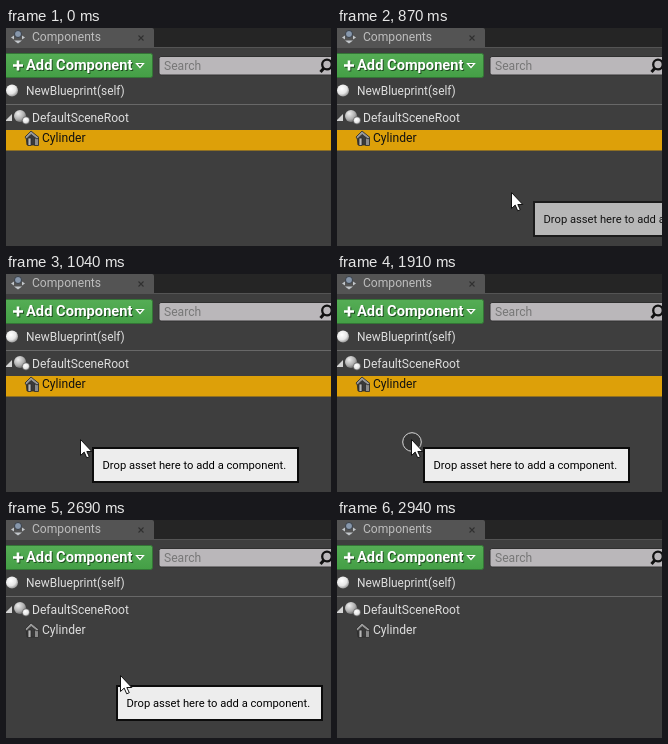
Recreate the animation shown at these times as an HTML page. Size 325 by 218 pixels, loop 3750 ms.

```html
<!DOCTYPE html>
<html lang="en">
<head>
<meta charset="utf-8">
<title>Components panel</title>
<style>
  html, body { margin: 0; width: 100%; height: 100%; overflow: hidden; background: #3e3e3e; }
  svg { display: block; width: 325px; height: 218px; }
  text { font: 12.1px Roboto, "Noto Sans", sans-serif; fill: #dedede; }
  .button { font-size: 14.67px; font-weight: 700; fill: #fff; }
  .tip { font-size: 11.2px; fill: #000; }
</style>
</head>
<body>
<svg viewBox="0 0 325 218">
  <defs>
    <linearGradient id="green" x2="0" y2="1">
      <stop stop-color="#55ad55"/><stop offset="1" stop-color="#449f46"/>
    </linearGradient>
    <radialGradient id="ball" cx=".4" cy=".35" r=".7">
      <stop stop-color="#fff"/><stop offset=".6" stop-color="#e6e6e6"/><stop offset="1" stop-color="#8a8a8a"/>
    </radialGradient>
    <radialGradient id="grayBall" cx=".35" cy=".3" r=".8">
      <stop stop-color="#eee"/><stop offset=".6" stop-color="#adadad"/><stop offset="1" stop-color="#5c5c5c"/>
    </radialGradient>
  </defs>

  <rect width="325" height="218" fill="#3e3e3e"/>

  <!-- tab strip -->
  <rect width="325" height="19" fill="#252525"/>
  <path d="M0 0H146Q148 0 148 2V19H325V20H0Z" fill="#545454"/>
  <path d="M5 9.500L8 7.500V11.500ZM19 9.500L16 7.500V11.500ZM8 12.500H16L12 15.500Z" fill="#c3c7cb"/>
  <circle cx="12" cy="6" r="3.500" fill="#8797ab" stroke="#2d333b" stroke-width=".8"/>
  <text x="26" y="13" style="fill:#bdbdbd">Components</text>
  <path d="M132.500 7.500l5 5m0-5l-5 5" stroke="#303030" stroke-width="1.1"/>

  <!-- toolbar -->
  <rect x="-3" y="25.500" width="149.500" height="24" rx="2" fill="url(#green)" stroke="#347536"/>
  <path d="M8 38.500H18M13 33.500V43.500" stroke="#1f4d20" stroke-width="2.600"/>
  <path d="M7 37.500H17M12 32.500V42.500" stroke="#fff" stroke-width="2.600"/>
  <text class="button" x="21" y="43" style="fill:#1f4d20">Add Component</text>
  <text class="button" x="20" y="42">Add Component</text>
  <path d="M130.500 35.500H137.500L134 39.500Z" fill="#3b7a3c" stroke="#fff" stroke-width="1.200"/>
  <rect x="153" y="28.500" width="180" height="18.500" rx="2" fill="#bab7ba" stroke="#303030"/>
  <text x="158" y="42" style="fill:#777">Search</text>
  <circle cx="321" cy="36.500" r="4.800" fill="none" stroke="#111" stroke-width="2.300"/>
  <path d="M318 40L314.500 44" stroke="#111" stroke-width="3"/>

  <!-- tree -->
  <circle cx="6" cy="62.500" r="6" fill="url(#ball)"/>
  <text x="20" y="67" style="font-size:11.9px">NewBlueprint(self)</text>
  <path d="M0 76.500H325" stroke="#686868"/>
  <path d="M6 86V93H-1Z" fill="#d5d5d5"/>
  <circle cx="14" cy="88" r="6" fill="url(#grayBall)"/>
  <circle cx="20" cy="92.500" r="3.700" fill="url(#ball)" stroke="#3e3e3e" stroke-width=".6"/>
  <text x="26" y="94">DefaultSceneRoot</text>
  <rect id="selection" y="102" width="325" height="20.500" fill="#dda009"/>
  <g stroke="#2b2b2b" stroke-width=".8">
    <path d="M20 108L25 104L32 109V117H21Z" fill="#3a3a3a"/>
    <path d="M22 110H25V117.500H22Z" fill="#b5b5b5"/>
    <path d="M28.500 110H32.500V117.500H28.500Z" fill="#8b8b8b"/>
    <path d="M19 109L25 103L33 109.500L31 111L25 106.500L20.500 111Z" fill="#999"/>
  </g>
  <text id="item" x="36" y="114">Cylinder</text>

  <g id="tooltip">
    <rect width="205" height="34" fill="#ededed" stroke="#0c0c0c" stroke-width="2"/>
    <text class="tip" x="9.500" y="21">Drop asset here to add a component.</text>
  </g>
  <circle id="ring" cx="75" cy="168" r="9.300" fill="#2b2b2b" fill-opacity=".5" stroke="#d8d8d8"/>
  <g id="cursor">
    <path d="M-.5-.5V15.500L3.200 12.100L5.700 17.800L8.300 16.700L5.800 11.500H10.800Z" fill="#fff" stroke="#111"/>
  </g>
</svg>
<script>
  const LOOP = 3750;
  const REST = [75, 166];
  const TIP_OFFSET = [12, 8];

  // Each path point is [step, x, y]; the tooltip trails the pointer by `lag` steps.
  const ENTER = {
    start: 650, end: 1040, step: 35.4, lag: 0.4,
    path: [[0, 319, 171], [3, 247, 169], [5, 199, 167.5], [6, 175, 165], [8, 125, 163],
           [9, 96, 164], [10, 76, 166], [11, 75, 166]]
  };
  const LEAVE = {
    start: 2580, end: 2940, step: 36, lag: 0.69,
    path: [[0, 75, 166], [1, 79, 163], [2, 92, 159], [3, 115, 156], [4, 146, 156],
           [5, 181, 164], [6, 220, 176], [7, 260, 190], [8, 300, 204], [9, 335, 216], [10, 360, 225]]
  };

  const el = id => document.getElementById(id);
  const show = (node, visible) => node.setAttribute("visibility", visible ? "visible" : "hidden");
  const place = (node, x, y) =>
    node.setAttribute("transform", `translate(${Math.round(x)} ${Math.round(y)})`);
  const [selection, item, tooltip, ring, cursor] =
    ["selection", "item", "tooltip", "ring", "cursor"].map(el);

  function along(path, step) {
    if (step <= path[0][0]) return path[0].slice(1);
    const next = path.findIndex(point => point[0] >= step);
    if (next < 0) return path[path.length - 1].slice(1);
    const [s0, x0, y0] = path[next - 1];
    const [s1, x1, y1] = path[next];
    const p = (step - s0) / (s1 - s0);
    return [x0 + (x1 - x0) * p, y0 + (y1 - y0) * p];
  }

  function pose(t) {
    const move = [ENTER, LEAVE].find(m => t >= m.start && t < m.end);
    if (!move) return [REST, REST];
    const step = Math.floor((t - move.start) / move.step);
    return [along(move.path, step), along(move.path, step - move.lag)];
  }

  function draw(t) {
    const selected = t < 1950;
    const dragging = t >= ENTER.start && t < LEAVE.end;
    const [pointer, trail] = pose(t);

    show(selection, selected);
    item.style.fill = selected ? "#111" : "#dedede";
    show(ring, t >= 1910 && t < 1990);
    show(cursor, dragging);
    show(tooltip, dragging);
    place(cursor, ...pointer);
    place(tooltip, trail[0] + TIP_OFFSET[0], trail[1] + TIP_OFFSET[1]);
    tooltip.setAttribute("opacity", Math.min(1, Math.max(0, (t - 760) / 160)));
  }

  const origin = performance.now();
  function tick() {
    draw((performance.now() - origin) % LOOP);
    requestAnimationFrame(tick);
  }
  tick();
</script>
</body>
</html>
```
